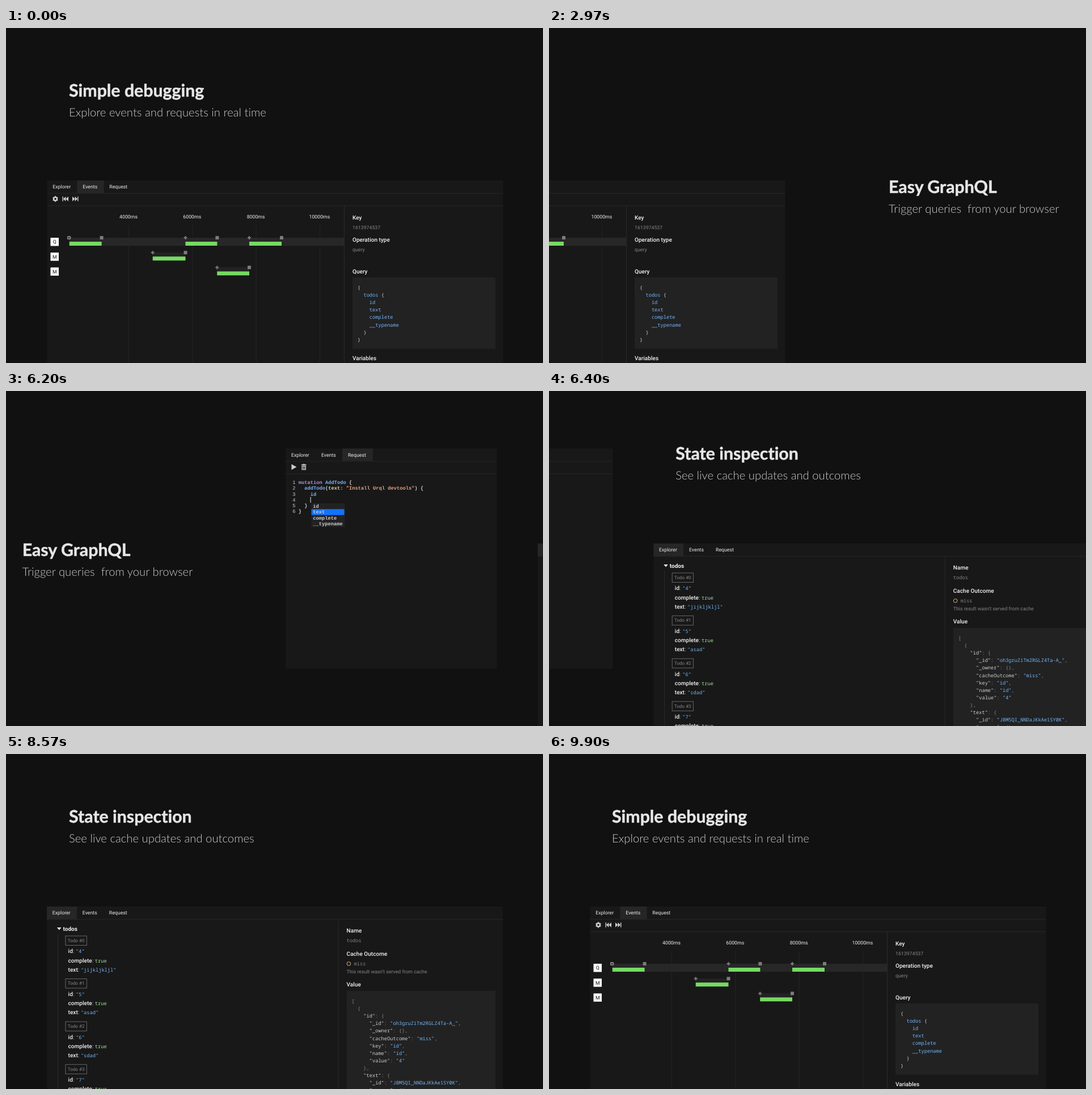
These frames come from a looping animation (947x591 px, 9.93 s). An HTML page:

```html
<!DOCTYPE html>
<html lang="en">
<head>
<meta charset="utf-8">
<title>Devtools carousel</title>
<style>
  html, body { margin: 0; width: 100%; height: 100%; overflow: hidden; background: #111; }
  svg { display: block; }
  text { white-space: pre; text-rendering: geometricPrecision; font: 8.75px Roboto, sans-serif; fill: #eee; }
  .title, .sub { font: 700 30.3px Lato, sans-serif; font-variant-ligatures: none; fill: #e6e6e6; }
  .title { stroke: #e6e6e6; stroke-width: .5px; }
  .sub { font-weight: 300; font-size: 20.3px; fill: #ccc; }
  .label { font-weight: 500; font-size: 10.05px; fill: #f2f2f2; }
  .bold { font-weight: 700; }
  .small { font-size: 8.05px; }
  .code, .value { font: 500 8.7px "Noto Sans Mono", monospace; fill: #ccc; }
  .edit { font: 700 8.75px "Liberation Mono", monospace; fill: #ccc; }
  .num { font-weight: 400; text-anchor: end; }
  .mid { text-anchor: middle; }
  .dim { fill: #858585; }
  .blue { fill: #73b4f7; }
  .green { fill: #a3e29b; }
  .purple { fill: #b08cee; }
  .sand { fill: #dfd3a4; }
  .orange { fill: #e9a27e; }
  .dark { fill: #111; }
</style>
</head>
<body>
<svg id="stage" width="947" height="591" viewBox="0 0 947 591"></svg>
<script>
const PITCH = 948, LOOP = 9930, STEP = 3306.5, START = 2856.6, SLIDE = 400;

const rect = (x, y, w, h, fill, extra = '') =>
  `<rect x="${x}" y="${y}" width="${w}" height="${h}" fill="${fill}" ${extra}/>`;
const path = (d, fill = '#ccc') => `<path d="${d}" fill="${fill}"/>`;
const text = (x, y, str, cls = '') => `<text x="${x}" y="${y}" class="${cls}">${str}</text>`;
const span = (cls, str) => `<tspan class="${cls}">${str}</tspan>`;
const lines = (x, y, gap, cls, rows) => rows.map((row, i) => text(x, y + i * gap, row, cls)).join('');
const headings = (y, title, sub) => text(111, y, title, 'title') + text(111, y + 35, sub, 'sub');
const slide = (id, index, body) =>
  `<svg id="${id}" x="${index * PITCH}" width="${PITCH}" height="591">${body}</svg>`;

function panel(x, y, height, active) {
  const tabs = [['Explorer', 0, 53], ['Events', 53, 47], ['Request', 100, 54]];
  return rect(x, y, 804, height, '#181818') +
    tabs.map(([name, left, width]) =>
      (name === active ? rect(x + left, y, width, 22, '#262626') : '') +
      text(x + left + 9.8, y + 14, name)).join('') +
    rect(x, y + 22, 804, 1, '#272727');
}

function eventsSlide() {
  const gear = '<circle cx="87" cy="301.5" r="2.9" fill="none" stroke="#ccc" stroke-width="2.4"/>' +
    [0, 60, 120].map(a => `<path d="M87 296.6v1.8M87 304.6v1.8" stroke="#ccc" stroke-width="2.4" transform="rotate(${a} 87 301.5)"/>`).join('');
  const skips = path('M99.5 297.3h1.4v8.4h-1.4zM105.4 297.3v8.4l-4.5-4.2zM110 297.3v8.4l-4.6-4.2z') +
    path('M117 297.3v8.4l4.5-4.2zM121.5 297.3v8.4l4.6-4.2zM126.1 297.3h1.4v8.4h-1.4z');
  const ticks = [4000, 6000, 8000, 10000].map((ms, i) => {
    const x = 216 + i * 112.3;
    return text(x, 335.8, ms + 'ms', 'mid') + rect(x, 348, 1, 243, '#252525');
  }).join('');
  const badges = ['Q', 'M', 'M'].map((letter, i) => {
    const y = 370 + i * 26.2;
    return rect(78.5, y, 14.5, 14.5, '#fff') + text(85.8, y + 10.4, letter, 'mid dark');
  }).join('');
  const request = (x, end, y) =>
    rect(x, y + 7, end - x, 7, '#76da63') +
    path(`M${x - 3} ${y - 1}h2v-2h2v2h2v2h-2v2h-2v-2h-2z`, '#7c7c7c') +
    rect(end - 3, y - 3, 6, 6, '#7c7c7c');
  const field = name => span('blue', name);

  return headings(121, 'Simple debugging', 'Explore events and requests in real time') +
    panel(72.5, 269, 330, 'Events') + rect(72.5, 313, 804, 1, '#272727') +
    gear + skips + ticks + badges +
    rect(111.5, 370, 485, 14.3, '#272727') +
    rect(258.5, 396, 58, 7, '#222') + rect(372, 422, 57, 7, '#222') +
    request(111.8, 168.6, 370) + rect(108, 367, 6, 6, '#7c7c7c') + rect(109.7, 369.3, 2.8, 1.6, '#222') +
    request(316.5, 372.4, 370) + request(429, 486, 370) +
    request(258.7, 316.5, 396.2) + request(372.2, 429, 422.4) +
    rect(596, 313, 1, 278, '#292929') +
    text(611, 337.5, 'Key', 'label') + text(611, 354.6, '1613974537', 'dim') +
    text(611, 376.5, 'Operation type', 'label') + text(611, 393.6, 'query', 'dim') +
    text(611, 433, 'Query', 'label') + rect(611, 440, 252, 126, '#222') +
    lines(620, 461, 13.1, 'code', ['{', `  ${field('todos')} {`,
      ...['id', 'text', 'complete', '__typename'].map(f => '    ' + field(f)), '  }', '}']) +
    text(611, 585.6, 'Variables', 'label');
}

function requestSlide() {
  const trash = path('M603.2 129.6h2.6l.8-1h2l.8 1h2.6v1.4h-8.8zM603.8 131.8h7.6v7.4h-7.6z') +
    path('M605.2 133h1v5h-1zM607.1 133h1v5h-1zM609 133h1v5h-1z', '#181818');
  return headings(290.5, 'Easy GraphQL', 'Trigger queries  from your browser') +
    panel(575.5, 101.5, 388.5, 'Request') + rect(575.5, 145.5, 804, 1, '#272727') +
    path('M585.8 129v10.2l9-5.1z') + trash +
    lines(593, 164, 10.25, 'edit num', [1, 2, 3, 4, 5, 6]) +
    lines(598, 164, 10.25, 'edit', [
      `${span('purple', 'mutation')} ${span('blue', 'AddTodo')} {`,
      `  ${span('blue', 'addTodo')}(${span('sand', 'text:')} ${span('orange', '"Install Urql devtools"')}) {`,
      '    ' + span('blue', 'id'), '', '  }', '}']) +
    rect(619, 187, 1, 10, '#eee') +
    rect(620.5, 198, 59.5, 42, '#222') + rect(621, 208.4, 58, 10.4, '#1272fa') +
    lines(623.5, 206, 10.3, 'edit', ['id', 'text', 'complete', '__typename']);
}

function explorerSlide() {
  const item = (name, i) => {
    const y = 321 + i * 75.6;
    const row = (dy, key, cls, value) =>
      text(109.6, y + dy, key + span('dim', ': ') + span('value ' + cls, value), 'label');
    return rect(105, y, 37.3, 16.5, 'none', 'stroke="#666"') +
      text(108.8, y + 10.8, 'Todo #' + i, 'dim small') +
      row(30.3, 'id', 'blue', `"${i + 4}"`) +
      row(46.5, 'complete', 'green', 'true') +
      row(62.8, 'text', 'blue', `"${name}"`);
  };
  const json = ['[', '  {', '    "id": {', '      "_id": "oh3gruZiTm2RGLZ4Ta-A_",', '      "_owner": {},',
    '      "cacheOutcome": "miss",', '      "key": "id",', '      "name": "id",', '      "value": "4"',
    '    },', '    "text": {', '      "_id": "JBM5QI_NNDaJKkAe1SY0K",', '      "_owner": {},'];
  const paint = line => line.replace(/("[^"]*")(:?)|[[\]{},]+/g, (all, str, colon) =>
    !str ? span('dim', all) : colon ? str + span('dim', ':') : span('blue', str));

  return headings(121, 'State inspection', 'See live cache updates and outcomes') +
    panel(72, 269, 330, 'Explorer') +
    rect(585.5, 291, 1, 300, '#292929') +
    path('M90 306h7.6l-3.8 4.6z', '#eee') + text(100.5, 311.8, 'todos', 'label bold') +
    rect(91, 317, 1, 274, '#2c2c2c') +
    ['jijkljkljl', 'asad', 'sdad', 'asdf'].map(item).join('') +
    text(600.6, 314.7, 'Name', 'label') + text(600.6, 332, 'todos', 'code dim') +
    text(600.6, 355.5, 'Cache Outcome', 'label') +
    '<circle cx="604.5" cy="370" r="3.3" fill="none" stroke="#dcb67e"/>' +
    text(613.5, 373, 'miss', 'code dim') +
    text(600.6, 386.8, "This result wasn't served from cache", 'dim') +
    text(600.6, 410, 'Value', 'label') + rect(600.6, 418, 262.4, 173, '#222') +
    lines(609.5, 439, 13.1, 'code', json.map(paint));
}

const stage = document.getElementById('stage');
stage.innerHTML = '<g id="track">' + slide('events', 0, eventsSlide()) +
  slide('request', 1, requestSlide()) + slide('explorer', 2, explorerSlide()) +
  `<use href="#events" x="${3 * PITCH}"/></g>`;
const track = document.getElementById('track');

// cubic-bezier(.25, .1, .25, 1), solved by bisection
function ease(p) {
  if (p <= 0 || p >= 1) return p <= 0 ? 0 : 1;
  let low = 0, high = 1, s;
  for (let i = 0; i < 20; i++) {
    s = (low + high) / 2;
    if (.75 * s * (1 - s) + s ** 3 < p) low = s; else high = s;
  }
  return .3 * s * (1 - s) ** 2 + 3 * s * s * (1 - s) + s ** 3;
}

function draw() {
  const t = performance.now() % LOOP;
  const index = Math.floor(t / STEP);
  const shift = PITCH * (index + ease((t - index * STEP - START) / SLIDE));
  track.setAttribute('transform', `translate(${-shift})`);
  requestAnimationFrame(draw);
}
draw();
</script>
</body>
</html>
```
